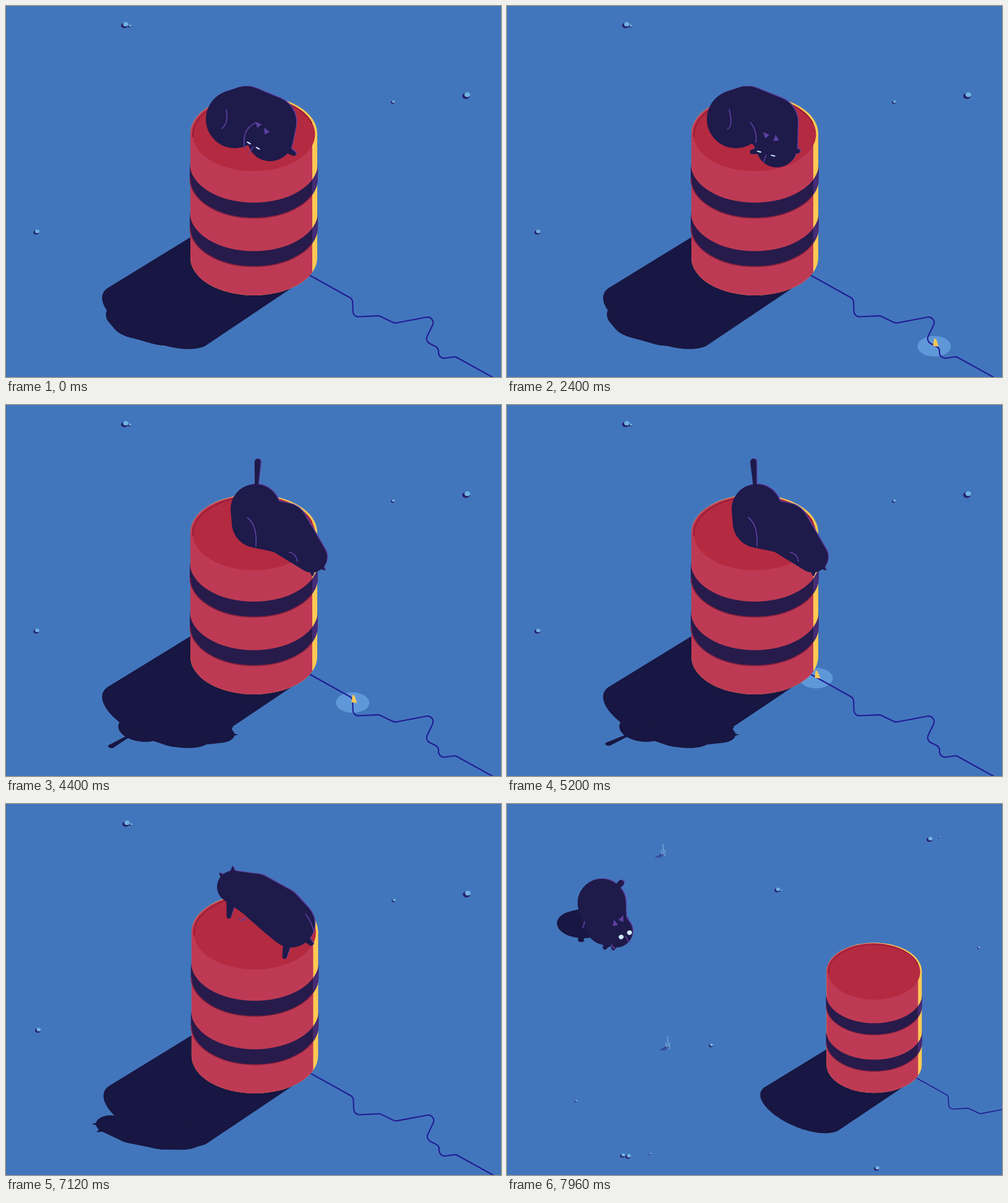
Animation, 800 px wide and 600 px high, one loop 8 s. Source, as an HTML page with a canvas:

```html
<!DOCTYPE html>
<html lang="en">
<head>
<meta charset="utf-8">
<title>Cat on a barrel</title>
<style>
html, body { margin: 0; width: 100%; height: 100%; overflow: hidden; background: #4276bc; }
canvas { display: block; width: 100vw; height: 100vh; }
</style>
</head>
<body>
<canvas id="stage" width="800" height="600"></canvas>
<script>
const ctx = document.getElementById('stage').getContext('2d');
const LOOP = 8000, TAU = Math.PI * 2;
const C = {
  ground: '#4276bc', shadow: '#181642', cat: '#1e1a4a', rim: '#5d409f',
  red: '#be3a54', lid: '#b42a41', lidLine: '#981b36', yellow: '#ffc953',
  band: '#271b4b', bandLit: '#452c76', bandLine: '#85203f',
  fuse: '#211c94', halo: '#5f98d9', eye: '#d3ebff', stone: '#70b3e3', stoneDark: '#262069'
};

// Linear part of the projection that casts a standing thing onto the ground
const CAST = [0.72, 0.44, 0.72, -0.38];
const ON_BARREL = [-189, 408];

// spine: circles from rump to head; the other parts are given by their tips
const poses = [
  { from: 0, to: 1, cast: ON_BARREL, open: 0.27, front: 1, wag: 0,
    spine: [[370, 183, 47], [388, 175, 45], [427, 188, 42], [427, 214, 37]],
    tail: [370, 183], paws: [[465, 239]],
    ears: [[403, 187], [417, 197]], eyes: [[392.5, 221.5], [407, 230]],
    folds: [[356, 167, 360, 190, 349, 198], [386, 230, 380, 200, 403, 189]] },
  { from: 800, to: 2300, cast: ON_BARREL, open: 0.27, front: 1, wag: 0,
    spine: [[370, 183, 47], [388, 175, 45], [428, 188, 42], [436, 228, 33]],
    tail: [370, 183], paws: [[470, 235], [396, 236]],
    ears: [[414, 204], [434, 208]], eyes: [[407.5, 235.5], [430, 242]],
    folds: [[359, 167, 366, 196, 356, 199], [393, 188, 405, 202, 402, 221]] },
  { from: 2500, to: 3600, cast: ON_BARREL, open: 0.5, front: 0, wag: 0,
    spine: [[414, 153, 36], [427, 162, 43], [462, 190, 38], [505, 241, 24]],
    tail: [377, 189], paws: [[515, 181], [391, 123], [433, 100]],
    ears: [[505, 241], [505, 241]], eyes: [[519, 230], [503, 239]],
    folds: [[392, 124, 412, 132, 411, 161], [463, 185, 492, 212, 460, 200]] },
  { from: 3750, to: 4350, cast: ON_BARREL, open: 0, front: 0, wag: 1,
    spine: [[403, 168, 40], [406, 190, 41], [448, 199, 41], [494, 246, 25]],
    tail: [398, 92], paws: [[408, 229]],
    ears: [[516, 268], [495, 278]], eyes: [[505, 250], [490, 255]],
    folds: [[390, 182, 406, 194, 404, 228], [457, 238, 469, 240, 471, 253]] },
  { from: 5950, to: 6760, cast: ON_BARREL, open: 0, front: 0, wag: 0,
    spine: [[461, 194, 38], [440, 174, 40], [403, 148, 35], [367, 134, 26]],
    tail: [461, 194], paws: [[360, 182], [450, 247], [493, 226]],
    ears: [[344, 111], [366, 100]], eyes: [[355, 130], [370, 130]],
    folds: [[484, 178, 494, 190, 498, 208], [376, 187, 384, 190, 387, 184]] },
  { from: 7130, to: 7440, cast: [-154, 315], open: 0, front: 0, wag: 0, lift: 45,
    spine: [[270, 194, 33], [256, 213, 34], [218, 240, 28], [190, 238, 27]],
    tail: [285, 146], paws: [[201, 290], [324, 211], [243, 268], [287, 235]],
    ears: [[166, 209], [181, 203]], eyes: [[175, 232], [190, 230]],
    folds: [[301, 185, 304, 200, 300, 216], [216, 268, 214, 276, 209, 283]] },
  { from: 7440, to: 7900, cast: [-105, 188], open: 0.9, front: 1, wag: 0,
    spine: [[153, 160, 39], [154, 166, 38], [160, 195, 33], [177, 206, 26]],
    tail: [184, 128], paws: [[172, 233], [158, 232]],
    ears: [[173, 187], [188, 180]], eyes: [[184.5, 215], [198, 208]],
    folds: [[122, 200, 125, 196, 125, 190], [169, 227, 170, 232, 175, 234]] }
];

const clamp = v => Math.max(0, Math.min(1, v));
const ease = k => k * k * (3 - 2 * k);
const dist = (a, b) => Math.hypot(a[0] - b[0], a[1] - b[1]);
const blend = (a, b, k) => Array.isArray(a) ? a.map((v, i) => blend(v, b[i], k)) : a + (b - a) * k;

// Every paw grows from the nearest spine circle; spare paws stay tucked in
for (const p of poses) {
  while (p.paws.length < 4) p.paws.push(p.spine[1].slice(0, 2));
  p.roots = p.paws.map(tip => p.spine.reduce((a, b) => dist(a, tip) < dist(b, tip) ? a : b));
}

function oval(x, y, rx, ry, color, turn = 0) {
  ctx.beginPath();
  ctx.ellipse(x, y, rx, ry, turn, 0, TAU);
  ctx.fillStyle = color;
  ctx.fill();
}
function poly(pts, color) {
  ctx.beginPath();
  pts.forEach(p => ctx.lineTo(p[0], p[1]));
  ctx.fillStyle = color;
  ctx.fill();
}
function stroke(width, color) {
  ctx.lineWidth = width;
  ctx.strokeStyle = color;
  ctx.stroke();
}
function line(x1, y1, x2, y2, width, color) {
  ctx.beginPath();
  ctx.moveTo(x1, y1);
  ctx.lineTo(x2, y2);
  stroke(width, color);
}

// Two circles joined by their outer tangents
function capsule([ax, ay, ar], [bx, by, br], color) {
  const d = Math.hypot(bx - ax, by - ay);
  if (d <= Math.abs(ar - br)) return ar > br ? oval(ax, ay, ar, ar, color) : oval(bx, by, br, br, color);
  const dir = Math.atan2(by - ay, bx - ax), spread = Math.acos((ar - br) / d);
  ctx.beginPath();
  ctx.arc(ax, ay, ar, dir + spread, dir - spread + TAU);
  ctx.arc(bx, by, br, dir - spread, dir + spread);
  ctx.fillStyle = color;
  ctx.fill();
}

const stones = [[193,30,5], [200,32,2.3], [745,144,5.5], [626,155,2.8], [50,365,4], [521,-79,5.5], [541,-83,2],
  [-241,485,2.8], [-140,602,4.5], [-128,604,5], [-81,599,2.5], [407,630,5]];
const tufts = [[-56, -48], [-46, 367]];

function ground() {
  for (const [x, y, r] of stones) {
    oval(x - r * 0.3, y + r * 0.3, r * 1.1, r * 0.85, C.stoneDark);
    oval(x + r * 0.1, y - r * 0.1, r * 0.85, r * 0.72, C.stone);
  }
  for (const [x, y] of tufts) {
    for (const i of [0, 1, 2]) {
      line(x + i * 3, y + 1, x + i * 5 - 14, y + 9, 1.3, C.stoneDark);
      line(x + i * 3, y + 5, x + i * 4 - 2, y - (i === 1 ? 20 : 7), 1.4, '#86bce5');
    }
  }
}

function barrelShadow(sway) {
  const [a, b, c, d] = CAST, pts = [];
  for (let i = 0; i <= 40; i++) {
    const u = 108 * Math.cos(Math.PI * i / 40), v = -61 * Math.sin(Math.PI * i / 40);
    pts.push([244.6 + sway * 10 + a * u + c * v, 502 + b * u + d * v]);
  }
  poly([...pts, [298, 374], [400, 420], [490, 437]], C.shadow);
}

const fuse = [[490,435], [560,474], [561,503], [603,501], [628,513], [697,500], [677,542], [699,553], [699,571],
  [726,567], [860,641]];

function fusePoint(d) {
  let i = 0;
  while (i < fuse.length - 2 && d > dist(fuse[i], fuse[i + 1])) d -= dist(fuse[i], fuse[++i]);
  return blend(fuse[i], fuse[i + 1], d / dist(fuse[i], fuse[i + 1]));
}

function fuseAndSpark(t) {
  const u = (5200 - t) / 1000, left = 11 + 88.6 * u + 6.6 * u * u;
  const lit = t < 6000 && left > 0;
  const [x, y] = fusePoint(Math.max(0, left));
  if (lit) oval(x, y + 1.5, 27, 16.5, C.halo);
  ctx.beginPath();
  ctx.moveTo(...fuse[0]);
  fuse.forEach((p, i) => i && (i < fuse.length - 1 ? ctx.arcTo(...p, ...fuse[i + 1], 9) : ctx.lineTo(...p)));
  stroke(2.1, C.fuse);
  if (lit) {
    const lean = Math.sin(t / 70);
    poly([[x - 2, y + 1], [x + lean, y - 11], [x + 3 + lean, y - 10], [x + 7, y + 2]], C.yellow);
  }
}

function sides(lit, sway) {
  const bottom = 407 - 4 * sway;
  ctx.beginPath();
  ctx.moveTo(298, 206);
  ctx.lineTo(298, bottom);
  ctx.ellipse(400.5, bottom, 102.5, 61, 0, Math.PI, 0, true);
  ctx.lineTo(503, 206);
  ctx.fillStyle = lit ? C.yellow : C.red;
  ctx.fill();
  for (const y of [255, 333.5]) {
    const ry = 63 + 4 * sway;
    ctx.beginPath();
    ctx.ellipse(400.5, y + 25, 103.5, ry, 0, 0, Math.PI);
    ctx.ellipse(400.5, y, 103.5, ry, 0, Math.PI, 0, true);
    ctx.fillStyle = lit ? C.bandLit : C.band;
    ctx.fill();
    ctx.beginPath();
    ctx.ellipse(400.5, y + 25, 103, ry, 0, 0, Math.PI);
    if (!lit) stroke(1.6, C.bandLine);
  }
}

function barrel(sway) {
  const y = 206 + 3 * sway, grow = 4 * sway;
  ctx.save();
  ctx.translate(340, 450);
  ctx.rotate(0.042 * sway);
  ctx.translate(-340, -450);
  oval(400.5, y, 102.5 + grow / 2, 61.5 + grow, C.yellow);
  sides(true, sway);
  ctx.save();
  ctx.beginPath();
  ctx.rect(280, 206, 215 + 2 * sway, 300);
  ctx.clip();
  sides(false, sway);
  ctx.restore();
  oval(398.3, y + 0.5, 100.3 + grow / 2, 61 + grow, C.red);
  oval(400.5, y + 1.5, 99 + grow / 2, 59.7 + grow, C.lid);
  ctx.beginPath();
  ctx.ellipse(400.5, y + 1.5, 98.5 + grow / 2, 59.2 + grow, 0, Math.PI * 0.98, Math.PI * 1.9);
  stroke(2, C.lidLine);
  ctx.restore();
}

function catAt(t) {
  let i = poses.length - 1;
  while (t < poses[i].from) i--;
  const b = poses[i], a = poses[Math.max(0, i - 1)];
  const raw = clamp((t - b.from) / (b.to - b.from));
  const k = b.lift ? raw ** 1.25 : ease(raw);
  const cat = { lift: (b.lift || 0) * Math.sin(Math.PI * raw) };
  for (const key of ['spine', 'tail', 'paws', 'roots', 'ears', 'eyes', 'folds', 'cast', 'open', 'front', 'wag'])
    cat[key] = blend(a[key], b[key], k);
  cat.tail[0] += cat.wag * 14 * Math.sin((t - 5200) / 210);
  return cat;
}

// Triangle with its base a little nearer to the head
function ears({ ears, spine }, color) {
  const head = spine[3];
  for (const tip of ears) {
    const d = Math.max(1, dist(tip, head)), ux = (head[0] - tip[0]) / d, uy = (head[1] - tip[1]) / d;
    const x = tip[0] + ux * 10, y = tip[1] + uy * 10;
    poly([tip, [x - uy * 4.5, y + ux * 4.5], [x + uy * 4.5, y - ux * 4.5]], color);
  }
}

function silhouette(cat, color) {
  const { spine, tail, paws, roots } = cat;
  for (let i = 1; i < spine.length; i++) capsule(spine[i - 1], spine[i], color);
  capsule([spine[0][0], spine[0][1], 0.5], [...tail, 5], color);
  paws.forEach((tip, i) => capsule([roots[i][0], roots[i][1], 11], [...tip, 3.5], color));
  ears(cat, color);
}

function face({ eyes: [a, b], open }) {
  if (open < 0.05) return;
  const dx = b[0] - a[0], dy = b[1] - a[1], d = Math.hypot(dx, dy) || 1;
  const x = (a[0] + b[0]) / 2, y = (a[1] + b[1]) / 2;
  line(x, y + 2, x - dy / d * 14, y + dx / d * 14, 1.5, C.rim);
  for (const e of [a, b]) oval(e[0], e[1], 4, 4 * open, C.eye, Math.atan2(dy, dx));
}

function drawCat(cat) {
  ctx.save();
  ctx.translate(1.4, -1 - cat.lift);
  silhouette(cat, C.rim);
  ctx.translate(-1.4, 1);
  silhouette(cat, C.cat);
  for (const f of cat.folds) {
    ctx.beginPath();
    ctx.moveTo(f[0], f[1]);
    ctx.quadraticCurveTo(...f.slice(2));
    stroke(1.7, C.rim);
  }
  ctx.globalAlpha = cat.front;
  ears(cat, C.rim);
  ctx.globalAlpha = 1;
  face(cat);
  ctx.restore();
}

function draw(t) {
  const away = 0.068 * Math.max(0, (t - 7090) / 350) ** 1.424;
  const world = () => ctx.setTransform(1 - away, 0, 0, 1 - away, 1175 * away, 465 * away);
  const screen = () => ctx.setTransform(1, 0, 0, 1, 0, 0);
  const sway = Math.sin(Math.PI * clamp((t - 7220) / 440));
  const cat = catAt(t);

  screen();
  ctx.lineCap = ctx.lineJoin = 'round';
  ctx.fillStyle = C.ground;
  ctx.fillRect(0, 0, 800, 600);

  world();
  ground();
  barrelShadow(sway);
  ctx.setTransform(...CAST, ...cat.cast);
  silhouette(cat, C.shadow);
  world();
  fuseAndSpark(t);
  barrel(sway);
  screen();
  drawCat(cat);
}

const start = performance.now();
function tick() {
  draw((performance.now() - start) % LOOP);
  requestAnimationFrame(tick);
}
tick();
</script>
</body>
</html>
```
